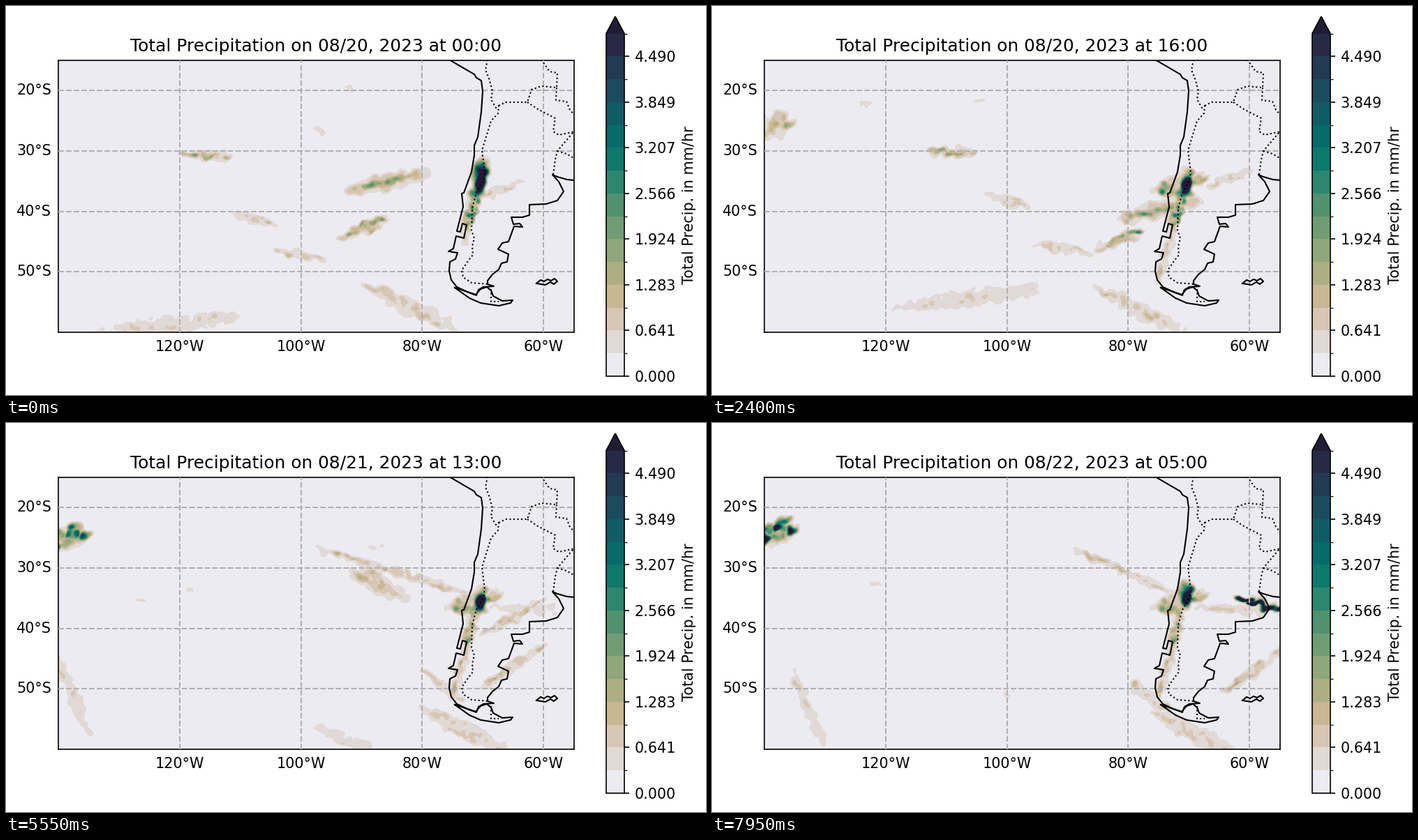
These frames come from a looping animation (1003x558 px, 8000 ms). A matplotlib script:

```python
import matplotlib.pyplot as plt
import numpy as np
from matplotlib.animation import FuncAnimation
from matplotlib.cm import ScalarMappable
from matplotlib.colors import BoundaryNorm, ListedColormap

W, H, DPI = 1003, 558, 150
LEFT, RIGHT, TOP, BOTTOM = 75.3, 813.6, 77.6, 468.2
STEP = 0.32073
LEVELS = STEP * np.arange(16)
COLORS = ["#ecebf2", "#e1d9d5", "#d8c6b4", "#c8b792", "#aeae83", "#90a67b",
          "#709c74", "#509170", "#2c876e", "#0d7a6d", "#056c6b", "#0f5c66",
          "#1b4b5f", "#233a53", "#262a47", "#211b36"]
HOURS = 54

plt.rcParams.update({"font.family": "DejaVu Sans", "font.size": 9.95})
rng = np.random.default_rng(11)

gx = np.arange(LEFT - 1, RIGHT + 3, 2)
gy = np.arange(TOP - 1, BOTTOM + 3, 2)
GX, GY = np.meshgrid(gx, gy)


def noise(short, long, waves=26):
    """Smooth random field with unit variance."""
    out = np.zeros_like(GX)
    for _ in range(waves):
        k = 2 * np.pi / rng.uniform(short, long)
        turn, phase = rng.uniform(0, 2 * np.pi, 2)
        out += np.sin(k * (GX * np.cos(turn) + GY * np.sin(turn)) + phase)
    return out * np.sqrt(2 / waves)


WX, WY = GX + 2 * noise(14, 40), GY + 1.8 * noise(14, 40)
TEXTURE = np.exp(0.15 * noise(9, 26))


def add_cell(field, cx, cy, ux, uy, half, thick, peak):
    """Ellipse along (ux, uy) that falls to the first level at its rim."""
    if peak < STEP:
        return
    reach = 1.7 * max(half, thick) + 6
    i0, i1 = np.searchsorted(gy, (cy - reach, cy + reach))
    j0, j1 = np.searchsorted(gx, (cx - reach, cx + reach))
    win = np.s_[i0:i1, j0:j1]
    dx, dy = WX[win] - cx, WY[win] - cy
    r2 = ((dx * ux + dy * uy) / half) ** 2 + ((dy * ux - dx * uy) / thick) ** 2
    fall = np.log(peak / STEP)
    fall = np.where(r2 < 1, fall, max(fall, 1.2))
    field[win] = np.maximum(field[win], STEP * np.exp(fall * (1 - r2)))


class Band:
    """Drifting rain band: a faint envelope strewn with seeded cells.

    tips: both ends at mid-life, drift: pixels per hour, grow: share of the
    peak gained over the lifetime, anchor: the second tip stays in place.
    """

    def __init__(self, start, stop, tips, drift, thick, peak,
                 grow=0, anchor=False):
        self.start, self.stop = start, stop
        self.a, self.b = np.reshape(tips, (2, 2)).astype(float)
        self.drift = np.array(drift, float)
        self.thick, self.peak = thick, peak
        self.grow, self.anchor = grow, anchor
        n = 3 + int(np.hypot(*(self.b - self.a)) / 16)
        self.cells = np.column_stack([
            rng.permutation(np.linspace(-0.8, 0.8, n)),
            rng.normal(0, 0.4, n),
            rng.uniform(0.12, 0.32, n),
            rng.uniform(0.35, 0.7, n),
            rng.permutation(np.linspace(0.35, 1, n)),
            rng.uniform(0, 2 * np.pi, n)])

    def paint(self, field, hour):
        edge = min(hour - self.start, self.stop - hour)
        if edge <= 0:
            return
        life = (hour - self.start) / (self.stop - self.start)
        peak = self.peak * min(edge / 4, 1) ** 0.5
        peak *= 1 - self.grow * (1 - life)
        move = self.drift * (hour - (self.start + self.stop) / 2)
        a, b = self.a + move, self.b + move * (not self.anchor)
        mid, half = (a + b) / 2, np.hypot(*(b - a)) / 2
        u = (b - a) / (2 * half)
        across = np.array([-u[1], u[0]]) * self.thick
        add_cell(field, *mid, *u, half, self.thick,
                 min(0.3 + 0.28 * peak, 1.2, peak))
        for along, off, size, wide, gain, phase in self.cells:
            c = mid + along * half * u + off * (1 - along ** 2) * across
            thick = wide * self.thick
            gain *= 0.85 + 0.15 * np.sin(0.4 * hour + phase)
            add_cell(field, *c, *u, size * half + thick, thick, gain * peak)


BANDS = [
    # subtropical cluster, then the cold front that hangs on the Andes
    Band(-5, 32, (302, 211, 370, 210), (3.6, -0.3), 8, 2.5),
    Band(20, 60, (458, 180, 666, 246), (4.5, 0), 6, 1.2, anchor=True),
    Band(32, 50, (535, 222, 605, 252), (8, 0.5), 14, 1.7),
    # mid-latitude low with its arms
    Band(-5, 22, (545, 285, 650, 262), (6, 2.5), 13, 2.6),
    Band(-5, 29, (535, 345, 600, 315), (4.5, 1), 8, 2.7),
    Band(-5, 29, (375, 277, 440, 297), (4.3, -1.6), 6, 1.1),
    Band(-5, 29, (447, 343, 523, 358), (5, -0.6), 6, 1.1),
]
BANDS += [
    # southern ocean
    Band(-5, 20, (200, 452, 392, 428), (8.5, -2.4), 12, 0.75),
    Band(-5, 60, (580, 410, 700, 468), (2.2, 0.3), 11, 1.1),
    Band(30, 60, (95, 348, 140, 455), (2.5, 1), 8, 0.8),
    Band(33, 48, (455, 430, 552, 470), (3, -2), 7, 0.6),
    # lee of the Andes and the Plate
    Band(-5, 20, (690, 268, 752, 246), (2, -1), 6, 1),
    Band(18, 40, (676, 314, 758, 266), (1.2, -1.5), 7, 1.8),
    Band(36, 60, (698, 265, 790, 268), (0, 0), 7, 0.9),
    Band(33, 60, (712, 385, 800, 322), (3, 0.5), 8, 1.5),
]
BANDS += [
    Band(38, 49, (740, 284, 800, 262), (0, 0), 11, 1.5),
    Band(48, 62, (757, 251, 825, 268), (2, 0.5), 9, 14),
    # growing storm at the western rim
    Band(13, 62, (68, 174, 116, 158), (0.2, -0.5), 16, 10, grow=0.85),
    # rain held by the mountains and the southern coast
    Band(-9, 36, (676, 262, 667, 306), (0, 0), 9, 3.8),
    Band(-9, 64, (675, 250, 656, 340), (0, 0), 9, 2.1),
    Band(12, 64, (642, 262, 706, 246), (0, 0), 14, 2.6),
    Band(4, 64, (658, 330, 640, 388), (0, 0), 9, 1.4),
    Band(30, 62, (600, 366, 655, 408), (0, 1), 8, 1.1),
]
# short-lived faint showers over the open ocean
for born in np.linspace(-6, 50, 16):
    x, y = rng.uniform(170, 540), rng.uniform(90, 400)
    dx, dy = rng.uniform(8, 20), rng.uniform(-4, 8)
    BANDS.append(Band(born, born + 11, (x, y, x + dx, y + dy), (3, 0),
                      3, 0.55))


def rain_at(hour):
    field = np.zeros_like(GX)
    for band in BANDS:
        band.paint(field, hour)
    cy = 250 + 8 * np.sin(np.pi * hour / 50)
    half = 22 + 14 * np.exp(-hour / 12)
    add_cell(field, 679, cy, -0.2, 0.98, half, 15, 9)
    return field * TEXTURE


COAST = [
    (635, 77), (671, 98), (674, 103), (681, 107), (683, 122), (681, 152),
    (676, 188), (671, 200), (671, 214), (667, 238), (656, 268), (653, 269),
    (655, 288), (646, 323), (651, 324), (654, 312), (660, 314), (656, 333),
    (645, 330), (641, 348), (634, 352), (647, 354), (644, 363), (636, 367),
    (635, 380), (638, 393), (646, 403), (663, 411), (674, 415), (677, 407),
    (684, 403), (699, 402), (690, 399)]
ATLANTIC = [
    (690, 399), (690, 394), (697, 385), (706, 378), (710, 369), (718, 367),
    (720, 356), (705, 349), (711, 340), (720, 338), (728, 316), (740, 317),
    (736, 312), (727, 313), (724, 303), (740, 303), (750, 300), (750, 285),
    (774, 284), (790, 279), (799, 266), (792, 252), (783, 242), (790, 245),
    (804, 249), (815, 250)]
FUEGO = [
    (643, 404), (673, 414), (680, 406), (689, 403), (695, 408), (698, 416),
    (711, 423), (726, 422), (723, 426), (706, 430), (680, 426), (664, 419),
    (643, 404)]
ISLANDS = [
    (760, 398), (766, 393), (771, 395), (776, 392), (781, 394), (786, 391),
    (790, 395), (785, 399), (780, 396), (773, 400), (760, 398)]
BORDERS = [
    [(690, 77), (687, 92), (692, 104), (697, 122), (695, 134), (702, 146),
     (706, 143), (705, 154), (695, 165), (682, 207), (686, 239), (684, 250),
     (674, 268), (668, 290), (667, 322), (671, 333), (668, 345), (669, 357),
     (662, 366), (653, 379), (655, 389), (667, 397), (692, 399)],
    [(695, 406), (695, 424), (706, 424)],
    [(706, 143), (716, 138), (747, 138), (753, 120), (767, 115), (789, 117),
     (790, 96), (779, 94), (767, 77)],
    [(747, 138), (762, 148), (787, 161), (784, 180), (792, 185), (815, 180)],
    [(789, 117), (788, 135), (803, 137), (808, 149), (815, 157)],
    [(812, 182), (790, 208), (787, 220), (784, 242)],
    [(790, 208), (803, 212), (815, 219)],
]


def box(left, top, right, bottom):
    return [left / W, 1 - bottom / H, (right - left) / W, (bottom - top) / H]


fig = plt.figure(figsize=(W / DPI, H / DPI), dpi=DPI, facecolor="white")
ax = fig.add_axes(box(LEFT, TOP, RIGHT, BOTTOM), facecolor=COLORS[0])
lons, lats = np.arange(120, 59, -20), np.arange(20, 51, 10)
ax.set_xticks(LEFT + (140 - lons) * (RIGHT - LEFT) / 85,
              [f"{v}°W" for v in lons])
ax.set_yticks(TOP + (lats - 15) * (BOTTOM - TOP) / 45,
              [f"{v}°S" for v in lats], va="center")
ax.tick_params(length=0, pad=5)
ax.set_axisbelow(False)
ax.grid(True, color="#b0b0b0", lw=1, ls="--")
for line in (COAST, ATLANTIC, FUEGO, ISLANDS):
    ax.plot(*zip(*line), color="black", lw=1, zorder=3)
for line in BORDERS:
    ax.plot(*zip(*line), color="black", lw=1, ls=":", zorder=3)
title = ax.set_title("", fontsize=11.93, pad=6)

cmap = ListedColormap(COLORS[:-1])
cmap.set_over(COLORS[-1])
cax = fig.add_axes(box(860, 15, 886, 531))
bar = fig.colorbar(ScalarMappable(BoundaryNorm(LEVELS, 15), cmap), cax=cax,
                   extend="max", format="%.3f", ticks=LEVELS[::2])
bar.set_ticks(LEVELS[1::2], minor=True)
bar.set_label("Total Precip. in mm/hr")

FIELDS = [rain_at(h) for h in range(HOURS)]
shown = {"hour": None, "fill": None}


def update(frame):
    hour = frame // 3
    if hour == shown["hour"]:
        return
    if shown["fill"] is not None:
        shown["fill"].remove()
    shown["hour"] = hour
    shown["fill"] = ax.contourf(gx, gy, FIELDS[hour], levels=LEVELS[1:],
                                colors=COLORS[1:], extend="max", zorder=1)
    ax.set(xlim=(LEFT, RIGHT), ylim=(BOTTOM, TOP))
    title.set_text(f"Total Precipitation on 08/{20 + hour // 24}, 2023 "
                   f"at {hour % 24:02d}:00")


anim = FuncAnimation(fig, update, frames=160, interval=50, repeat=True,
                     repeat_delay=0, blit=False)
plt.show()
```
